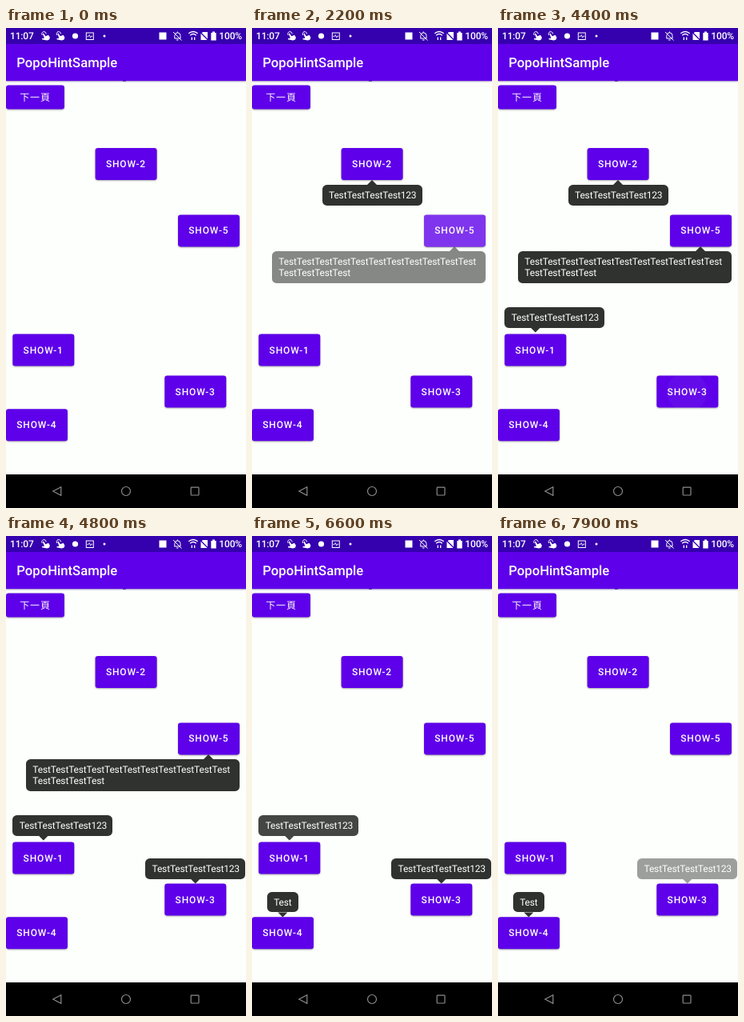
Animation of 300x600 px, one loop 8000 ms. Source, as an HTML page:

```html
<!DOCTYPE html>
<html lang="zh-Hant">
<head>
<meta charset="utf-8">
<title>Popup hints</title>
<style>
  html, body { margin: 0; width: 100%; height: 100%; overflow: hidden; background: #fdfffc; }
  body {
    position: relative; color: #fff; text-rendering: geometricPrecision;
    font: 400 12px/13.7px Roboto, "Noto Sans CJK TC", "Noto Sans CJK", sans-serif; letter-spacing: -.16px;
  }
  .stage { position: absolute; left: 0; top: 0; width: 300px; height: 600px; overflow: hidden; }
  .stage > svg { position: absolute; left: 0; top: 0; }

  .status { position: absolute; left: 0; top: 0; width: 300px; height: 20px; background: #3500ae; font-weight: 500; line-height: 21px; }
  .status span { position: absolute; top: 0; }
  .bar {
    position: absolute; left: 0; top: 20px; width: 300px; height: 46px; box-sizing: border-box; padding-left: 13.3px;
    background: #5e00e9; box-shadow: 0 1px 1.5px rgba(60, 20, 130, .5);
    font-weight: 500; font-size: 16.67px; line-height: 49px; letter-spacing: 0;
  }
  .nav { position: absolute; left: 0; top: 558px; width: 300px; height: 42px; background: #000; }

  .btn {
    position: absolute; left: 0; top: 0; width: 76.67px; height: 40px; transform: translate(var(--x), var(--y));
    border-radius: 3.3px; overflow: hidden; isolation: isolate; background: #5e00e9;
    box-shadow: 0 1px 2px rgba(0, 0, 0, .32);
    font-weight: 500; letter-spacing: .84px; line-height: 41px; text-align: center;
  }
  .next { width: 73px; height: 30px; line-height: 31px; }
  .btn::before {
    content: ""; position: absolute; z-index: -1; left: 50%; top: 50%; width: 88px; height: 88px;
    margin: -44px; border-radius: 50%; background: #fff; opacity: 0;
  }
  .tap::before { animation: ripple 8s var(--d) step-end infinite; }

  .layer { position: absolute; inset: 0; animation: restart 8s step-end infinite; }
  .tip {
    position: absolute; left: var(--x); top: var(--y); width: var(--w, 125px); height: var(--h, 25.6px);
    box-sizing: border-box; padding: 7.1px 0 0 8.3px; border-radius: 5.6px; background: #2f322f;
    white-space: nowrap; opacity: 0; animation: life 8s var(--d) step-end infinite;
  }
  .tip::after {
    content: ""; position: absolute; left: calc(var(--a) - 6px); top: 100%; width: 12px; height: 6px;
    background: inherit; clip-path: polygon(0 0, 100% 0, 50% 100%);
  }
  .below::after { top: -6px; transform: scaleY(-1); }

  @keyframes ripple {
    0% { opacity: .045; transform: scale(.57); }
    1.25% { opacity: .17; transform: scale(.9); }
    2.5% { opacity: .21; transform: none; }
    3.75% { opacity: .09; }
    5%, 100% { opacity: 0; }
  }
  @keyframes life {
    0% { opacity: 0; }
    1.25% { opacity: .12; }
    2.5% { opacity: var(--mid, .58); }
    3.75% { opacity: .96; }
    5% { opacity: 1; }
    42.5% { opacity: .9; }
    43.75% { opacity: .47; }
    45% { opacity: .09; }
    46.25%, 100% { opacity: 0; }
  }
  /* drops tips still open when the loop starts over */
  @keyframes restart {
    0% { opacity: 0; }
    12.5%, 100% { opacity: 1; }
  }
</style>
</head>
<body>
<div class="stage">
  <div class="bar">PopoHintSample</div>
  <div class="status">
    <span style="left:5px">11:07</span>
    <span style="right:5px">100%</span>
  </div>
  <div class="nav"></div>

  <svg width="300" height="600" fill="none" stroke="#fff">
    <defs>
      <g id="touch">
        <path d="M-4.2 -1A2.7 2.7 0 1 1 .6 -2.6" stroke-width="1"/>
        <path d="M-2.6 -3.4L-.2 .2L3.6 -1.2L5.4 1.8L4.6 4.6L1.6 5.4L-4.6 4.2L-4.4 3L-1.6 2.8L-3.6 -2.8Z" fill="#fff" stroke="none"/>
      </g>
    </defs>
    <use href="#touch" x="49.5" y="10"/>
    <use href="#touch" x="68" y="10"/>
    <circle cx="86.5" cy="10" r="3.6" fill="#fff" stroke="none"/>
    <rect x="100.3" y="6" width="9" height="8.5"/>
    <path d="M101.5 10.5H103L104.3 8.7L105.6 12L106.8 10.2H108.3" stroke-width=".9"/>
    <circle cx="123" cy="10" r="1.5" fill="#fff" stroke="none"/>
    <rect x="191.5" y="5.5" width="9" height="9" fill="#fff" stroke="none"/>
    <path d="M210.5 13H218V9.5A3.6 3.6 0 0 0 210.8 9.5V13M209 5L219.5 15.5M213 15H215.5M214.4 4.5V6"/>
    <path d="M228.3 6.8Q234 2 239.7 6.8M230.2 9.2Q234 6 237.8 9.2" stroke-width="1.4"/>
    <path d="M232.3 11.5V15M235.7 11.5V15" stroke-width="1.3"/>
    <path d="M246 5H252V15H243.5V7.5Z" fill="#fff" stroke="none"/>
    <path d="M242.5 5L253 15.5" stroke="#3500ae" stroke-width="1.3"/>
    <path d="M256.3 6H258V4.6H261V6H262.7V15.5H256.3Z" fill="#fff" stroke="none"/>
    <g stroke="#8c8c8c" stroke-width="1.2">
      <path d="M58.8 579L68.8 573.8V584.2Z"/>
      <circle cx="150" cy="579" r="5.5"/>
      <rect x="231.2" y="574.2" width="9.8" height="9.8" rx=".8"/>
    </g>
    <path d="M146 66.3H150" stroke="#3b0a9c" stroke-width=".8"/>
  </svg>

  <div class="btn next" style="--x:0px;--y:71.6px">下一頁</div>
  <div class="btn tap" style="--x:111.6px;--y:150px;--d:1.1s">SHOW-2</div>
  <div class="btn tap" style="--x:215px;--y:233.4px;--d:2s">SHOW-5</div>
  <div class="btn tap" style="--x:8.3px;--y:382.5px;--d:3.2s">SHOW-1</div>
  <div class="btn tap" style="--x:198.3px;--y:434.6px;--d:4.4s">SHOW-3</div>
  <div class="btn tap" style="--x:0px;--y:476.3px;--d:5.4s">SHOW-4</div>

  <div class="layer">
    <div class="tip below" style="--x:87.7px;--y:196px;--a:62.5px;--d:1.1s;--mid:.66">TestTestTestTest123</div>
    <div class="tip below" style="--x:25px;--y:279.3px;--w:267px;--h:39.5px;--a:228.4px;--d:2s">TestTestTestTestTestTestTestTestTestTestTest<br>TestTestTestTest</div>
    <div class="tip" style="--x:8.4px;--y:349px;--a:38.4px;--d:3.2s">TestTestTestTest123</div>
    <div class="tip" style="--x:174.2px;--y:403px;--a:62.5px;--d:4.4s">TestTestTestTest123</div>
    <div class="tip" style="--x:18.9px;--y:444.8px;--w:39px;--a:19.5px;--d:5.4s;--mid:.5">Test</div>
  </div>
</div>
</body>
</html>
```
